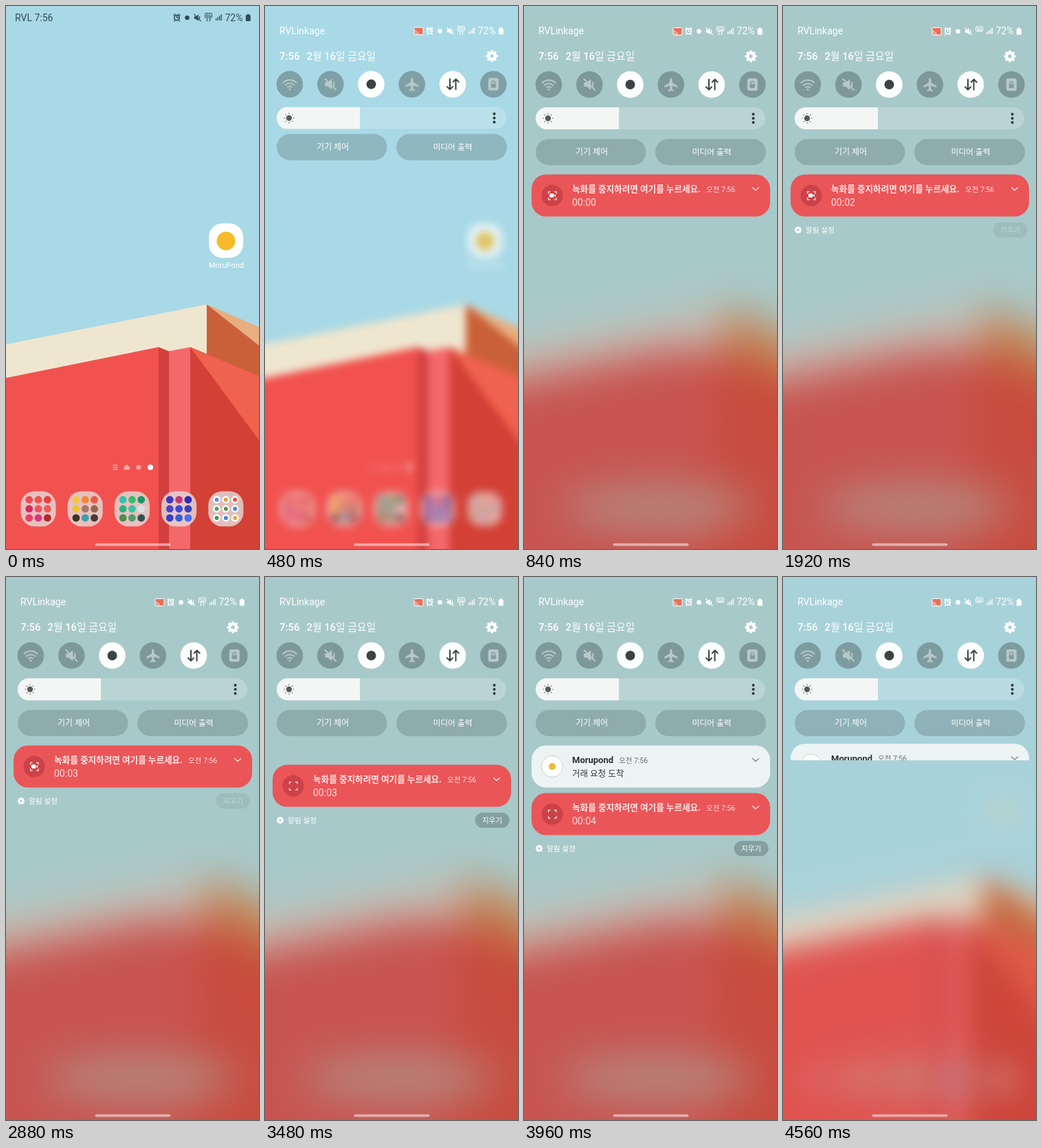
Write an HTML page that moves like this. It is 368 by 788 pixels and loops after 4680 ms.

```html
<!DOCTYPE html>
<html lang="ko">
<head>
<meta charset="utf-8">
<title>Notification shade</title>
<style>
html, body { margin: 0; width: 100%; height: 100%; overflow: hidden; background: #a9d9e6; }
svg { display: block; width: 100vw; height: 100vh; }
text { font-family: Roboto, "Noto Sans CJK KR", "Noto Sans CJK", sans-serif; white-space: pre; }
.mid { text-anchor: middle; }
.med { font-weight: 500; }
.line { fill: none; stroke: currentColor; stroke-linecap: round; stroke-linejoin: round; }
.ink { fill: currentColor; }
</style>
</head>
<body>
<svg id="stage" viewBox="0 0 368 788" preserveAspectRatio="none">
<defs>
  <filter id="soft" filterUnits="userSpaceOnUse" x="-120" y="-120" width="608" height="1028" color-interpolation-filters="sRGB">
    <feGaussianBlur id="softBlur" stdDeviation="0"/>
  </filter>
  <filter id="deepSoft" filterUnits="userSpaceOnUse" x="-120" y="-120" width="608" height="1028" color-interpolation-filters="sRGB">
    <feGaussianBlur stdDeviation="30"/>
  </filter>
  <clipPath id="shadeClip"><rect id="shadeRect" width="368" height="0"/></clipPath>
  <clipPath id="track"><rect x="17" y="147" width="334" height="32" rx="16"/></clipPath>
  <symbol id="gear" viewBox="-10 -10 20 20">
    <g id="teeth" class="ink"></g>
    <circle r="5.2" class="line" stroke-width="4.4"/>
  </symbol>
  <symbol id="mute" viewBox="-10 -10 20 20">
    <path class="ink" d="M-8-3h4l6-5v16l-6-5h-4z"/>
    <path class="line" stroke-width="2" d="M-8-8L8 8M5-3v6"/>
  </symbol>
</defs>

<g id="home">
  <g id="wall"></g>
  <g id="icons"></g>
</g>
<g id="deep" filter="url(#deepSoft)"></g>
<g id="homeStatus" color="#2f4c57">
  <text x="13" y="21.5" font-size="14" fill="currentColor">RVL 7:56</text>
</g>

<g id="header" color="#fff" fill="#fff">
  <text x="21" y="41" font-size="14">RVLinkage</text>
  <g>
    <rect x="217" y="31.5" width="13" height="10.5" rx="1" fill="#e8705a" stroke="#fff"/>
    <path class="line" d="M218 36.500a5 5 0 0 1 5 5M218 39a2.500 2.500 0 0 1 2.500 2.500"/>
  </g>
  <g id="headStatus"></g>
  <text class="med" x="21" y="78.300" font-size="15">7:56</text>
  <text class="med" x="60.500" y="78.300" font-size="14.800">2월 16일 금요일</text>
  <use href="#gear" x="321" y="64" width="18" height="18"/>
  <g id="toggles"></g>
  <g clip-path="url(#track)">
    <rect x="17" y="147" width="334" height="32" fill-opacity=".2"/>
    <rect x="17" y="147" width="121" height="32" fill="#f4f6f5"/>
  </g>
  <g id="sun" fill="#555b5c" stroke="#555b5c" transform="translate(35 163)"><circle r="4.200" stroke="none"/></g>
  <g fill="#2f3638"><circle cx="333.500" cy="157" r="2"/><circle cx="333.500" cy="163" r="2"/><circle cx="333.500" cy="169" r="2"/></g>
  <g id="buttons">
    <g fill="#556969" fill-opacity=".3">
      <rect x="17" y="193" width="160.500" height="38" rx="19"/>
      <rect x="191" y="193" width="161" height="38" rx="19"/>
    </g>
    <g class="mid med" font-size="12">
      <text x="98.500" y="216.300">기기 제어</text>
      <text x="273" y="216.300" font-size="11.800">미디어 출력</text>
    </g>
  </g>
</g>

<g clip-path="url(#shadeClip)">
<g id="cards">
  <g id="offer">
    <rect x="11" y="244.500" width="347" height="61" rx="21" fill="#f0f5f5" fill-opacity=".97"/>
    <circle cx="41" cy="275" r="15.500" fill="#fff" stroke="#b9c2c2" stroke-width=".8"/>
    <circle cx="41" cy="275" r="5" fill="#efbb35"/>
    <text x="70" y="270" font-size="13" font-weight="700" fill="#2b3032">Morupond</text>
    <text x="138" y="269.500" font-size="10.500" fill="#666e70">오전 7:56</text>
    <text class="med" x="70" y="289.500" font-size="12.500" fill="#34393b">거래 요청 도착</text>
    <path class="line" color="#7c8485" stroke-width="1.300" d="M332.500 263.500l4.500 4 4.500-4"/>
  </g>
  <g id="record" color="#fff" fill="#fff">
    <rect x="11" y="244.500" width="347" height="61" rx="21" fill="#ea5558"/>
    <circle cx="41" cy="275" r="15.500" fill="#cc4248"/>
    <path class="line" color="#fbdcdc" stroke-width="1.300" d="M35.500 272v-2.500h2.500M44.500 269.500h2.500v2.500M47 278.500v2.500h-2.500M38 281h-2.500v-2.500"/>
    <g id="camera"><rect x="37" y="272.300" width="6.300" height="5.500" rx="1"/><path d="M43.500 275l2.500-2v4.200z"/></g>
    <text x="70" y="270" font-size="12.600" font-weight="700" fill="#ffe9e8">녹화를 중지하려면 여기를 누르세요.</text>
    <text x="265" y="269.500" font-size="10.500" fill="#ffdedd">오전 7:56</text>
    <text id="count" x="70" y="290" font-size="14" fill="#ffdedd">00:00</text>
    <path class="line" color="#ffe1e0" stroke-width="1.300" d="M332.500 263.500l4.500 4 4.500-4"/>
  </g>
  <g id="footer" color="#fff" fill="#fff">
    <use href="#gear" x="16.500" y="319.500" width="11" height="11"/>
    <text class="med" x="33" y="328.800" font-size="10.700">알림 설정</text>
    <g id="clear">
      <rect x="305.500" y="314" width="50" height="22" rx="11" fill="#607878" fill-opacity=".5"/>
      <text class="mid med" x="330.500" y="328.800" font-size="10.500">지우기</text>
    </g>
  </g>
</g>
</g>
<rect x="129.500" y="779.700" width="110" height="3.800" rx="1.900" fill="#fff" fill-opacity=".5"/>
</svg>

<script>
const LOOP = 4680, STEP = 120;
const $ = id => document.getElementById(id);
const poly = (pts, fill) => `<polygon points="${pts}" fill="${fill}"/>`;
const disc = (x, y, r, fill) => `<circle cx="${x}" cy="${y}" r="${r}" fill="${fill}"/>`;

// The building runs past the stage so that blurring keeps full edges.
function building(c) {
  return `<rect x="-120" y="-120" width="608" height="1028" fill="${c.sky}"/>` +
    poly("-120,515 292,433 292,506 268,496 237,502 222,496 -120,565", c.cream) +
    poly("292,433 488,518 488,587", c.sand) +
    poly("292,433 292,506 488,587", c.clay) +
    poly("-120,564 222,495 222,908 -120,908", c.red) +
    poly("268,495 488,587 488,908 268,908", c.side) +
    poly("268,495 488,587 488,792", c.glow) +
    poly("222,495 237,501 237,908 222,908", c.edge) +
    poly("237,501 268,495 268,908 237,908", c.pink);
}

function folder(colors, i) {
  const x = 47 + i * 68.2, y = 729.7;
  const minis = colors.split(" ").map((c, k) => {
    const mx = x + (k % 3 - 1) * 13.3, my = y + (Math.floor(k / 3) - 1) * 13.2;
    return i === 4 ? disc(mx, my, 5.4, "#fff") + disc(mx, my, 3, c) : disc(mx, my, 5.4, c);
  }).join("");
  return `<rect x="${x - 25.5}" y="${y - 25.5}" width="51" height="51" rx="20" fill="#e4d9d8" fill-opacity=".82"/>` + minis;
}

function statusIcons() {
  const bars = [3, 5, 7, 9].map((h, i) =>
    `<rect class="ink" x="${305 + i * 2.5}" y="${21 - h}" width="1.300" height="${h}"/>`).join("");
  return `<circle class="line" cx="248.500" cy="17" r="3.700" stroke-width="1.700"/>
    <path class="line" stroke-width="1.300" d="M244 13.500l2-1.700M253 13.500l-2-1.700M248.500 15v2.200h1.700M245.500 21l-1 1M251.500 21l1 1"/>
    <circle class="ink" cx="263.500" cy="17" r="3.300"/>
    <use href="#mute" x="272.500" y="11" width="12" height="12"/>
    <rect class="line" x="289.500" y="10.500" width="10" height="6.500" rx="1"/>
    <text class="mid ink" x="294.500" y="16" font-size="6" font-weight="700">5G</text>
    <path class="line arrows" d="M292.700 18.500v3.500l-1.200-1.200M296.300 22v-3.500l1.200 1.200"/>
    ${bars}
    <text class="ink" x="318.500" y="21.500" font-size="14">72%</text>
    <rect class="ink" x="348.700" y="13" width="7" height="9" rx="1.300"/>
    <rect class="ink" x="350.700" y="11.700" width="3" height="2"/>`;
}

const glyphs = [
  `<path class="line" stroke-width="2" d="M-9.500-2.500a13.500 13.500 0 0 1 19 0M-6.300 1a9 9 0 0 1 12.600 0M-3 4.300a4.300 4.300 0 0 1 6 0"/><circle class="ink" cy="7.200" r="1.500"/>`,
  `<use href="#mute" x="-10" y="-10" width="20" height="20"/>`,
  `<circle class="ink" r="7"/>`,
  `<path class="ink" d="M0-10q1.700 1 1.700 4v3l8 5v2.200l-8-2.400v4.600l2.600 2v1.600L0 9l-4.300 1v-1.600l2.600-2v-4.600l-8 2.400v-2.200l8-5v-3q0-3 1.700-4z"/>`,
  `<path class="line" stroke-width="2" d="M-4-7.500v14.500M-8 3.500l4 4 4-4M4.500 7.500v-14.500M.700-3.500l4-4 4 4"/>`,
  `<rect class="ink" x="-7.500" y="-9" width="15" height="18" rx="3"/><path d="M-3.500-.500h7v5.500h-7z" fill="#819b9c"/><path class="line" style="stroke:#819b9c" stroke-width="1.300" d="M-2.200-.500v-2a2.200 2.200 0 0 1 4.400 0v2"/>`
];

function toggle(glyph, i) {
  const on = i === 2 || i === 4;
  const face = on ? `fill="#fdfefe"` : `fill="#556969" fill-opacity=".5"`;
  return `<g transform="translate(${36 + i * 59.25} 114)" color="${on ? "#3c4345" : "#b7c8c9"}">
    <circle r="19.300" ${face}/>${glyph}</g>`;
}

function build() {
  $("wall").innerHTML = building({ sky: "#a9d9e6", cream: "#efe6cf", sand: "#e8ae7d", clay: "#ca6039",
    red: "#f1524f", side: "#d34036", glow: "#ef624f", edge: "#d1403f", pink: "#f5686a" });
  $("deep").innerHTML = building({ sky: "#a8c9c9", cream: "#c8bdb0", sand: "#c99863", clay: "#c27a4c",
    red: "#c75551", side: "#c84c40", glow: "#c84a3b", edge: "#c6524d", pink: "#c85a56" }) +
    `<ellipse cx="195" cy="727" rx="140" ry="30" fill="#b58a80"/>`;

  const folders = [
    "#ee4a55 #f0524c #e83f3f #d02a62 #ef5160 #ee5a55 #ee3d68 #e0357a #b5282c",
    "#f6c443 #f28a35 #ee5a46 #f2c22f #a8756a #96684a #3a3524 #3f9fb0 #4d3a34",
    "#35bfae #2fbf6c #15986d #26b47c #36c4a4 #d5e4e2 #4d8c4a #4f9e72 #34504f",
    "#4136c4 #c03a72 #2f2ab8 #4a43c8 #3a48d6 #3640b8 #3a3fc4 #2f5fd8 #4a6cf0",
    "#5b8fe8 #d9a03f #e0564a #4fa35e #55955a #4a86e0 #3f9a58 #4c84d8 #e0ab3c"
  ];
  $("icons").innerHTML =
    `<rect x="295" y="315.500" width="50" height="50" rx="20" fill="#fff"/>` + disc(320, 341, 13.5, "#f5bb2a") +
    `<text class="mid" x="320.500" y="380.300" font-size="11" fill="#fff">MoruPond</text>
     <path d="M155.500 666.500h7M155.500 669.500h7M155.500 672.500h7" stroke="#fff" stroke-opacity=".5" stroke-width="1.500"/>
     <path d="M171.500 669l4.300-3.500 4.300 3.500v4h-8.600z" fill="#fff" fill-opacity=".5"/>
     <circle cx="193" cy="669.500" r="3.600" fill="#fff" fill-opacity=".45"/>` +
    disc(210, 669.5, 4, "#fff") + folders.map(folder).join("");

  $("homeStatus").insertAdjacentHTML("beforeend", statusIcons());
  $("headStatus").innerHTML = `<g transform="translate(-9 19.700)">${statusIcons()}</g>`;
  $("toggles").innerHTML = glyphs.map(toggle).join("");
  for (let a = 0; a < 360; a += 45) {
    $("sun").insertAdjacentHTML("beforeend", `<path transform="rotate(${a})" d="M0-6v-1.500" stroke-width="1.200"/>`);
    $("teeth").insertAdjacentHTML("beforeend", `<rect x="-2" y="-9.500" width="4" height="5" rx="1" transform="rotate(${a})"/>`);
  }
}

// Linear interpolation through [time, value] points.
function key(t, pts) {
  if (t <= pts[0][0]) return pts[0][1];
  for (let i = 1; i < pts.length; i++) {
    const [t0, v0] = pts[i - 1], [t1, v1] = pts[i];
    if (t <= t1) return v0 + (v1 - v0) * (t - t0) / (t1 - t0);
  }
  return pts[pts.length - 1][1];
}
const within = (t, spans) => spans.some(([a, b]) => t >= a && t < b);
const easeOut = u => 1 - (1 - u) ** 3;
const easeInOut = u => u < .5 ? 4 * u ** 3 : 1 - 4 * (1 - u) ** 3;
const fade = (id, v) => $(id).setAttribute("opacity", v);
const shift = (id, y) => $(id).setAttribute("transform", `translate(0 ${y})`);

function draw(t) {
  const blur = key(t, [[0, 0], [120, 1], [720, 9], [840, 26], [4320, 26], [4560, 18]]);
  $("softBlur").setAttribute("stdDeviation", blur);
  if (blur) $("home").setAttribute("filter", "url(#soft)");
  else $("home").removeAttribute("filter");
  fade("deep", key(t, [[720, 0], [840, 1], [4320, 1], [4440, .75], [4560, .4]]));
  fade("icons", key(t, [[0, 1], [720, .55], [840, 0], [4320, 0], [4560, .3]]));

  fade("homeStatus", key(t, [[0, 1], [300, 0]]));
  fade("header", key(t, [[60, 0], [480, 1]]));
  shift("header", -36 * (1 - easeOut(key(t, [[60, 0], [600, 1]]))));
  shift("buttons", key(t, [[120, -14], [720, -2], [840, 0]]));

  $("shadeRect").setAttribute("height",
    key(t, [[480, 0], [720, 238], [840, 312], [1200, 788], [4320, 788], [4440, 345], [4560, 266]]));
  shift("cards", key(t, [[4320, 0], [4560, -2.5]]));

  const drop = 69 * easeInOut(key(t, [[3200, 0], [3800, 1]]));
  shift("record", drop);
  shift("footer", drop);
  fade("footer", key(t, [[840, 0], [1080, 1]]));
  fade("clear", key(t, [[3120, .28], [3480, 1]]));
  fade("offer", key(t, [[3480, 0], [3720, 1]]));

  const secs = [960, 1920, 2880, 3840].filter(s => t >= s).length;
  $("count").textContent = "00:0" + secs;
  fade("camera", within(t, [[0, 1560], [1920, 2400], [2880, 3360], [4080, 4440]]) ? 1 : 0);
  const busy = !within(t, [[1680, 2760], [3840, LOOP]]);
  document.querySelectorAll(".arrows").forEach(a => a.setAttribute("opacity", busy ? 1 : 0));
}

build();
const start = performance.now();
function tick() {
  const t = (performance.now() - start) % LOOP;
  draw(Math.floor(t / STEP) * STEP);
  requestAnimationFrame(tick);
}
tick();
</script>
</body>
</html>
```
